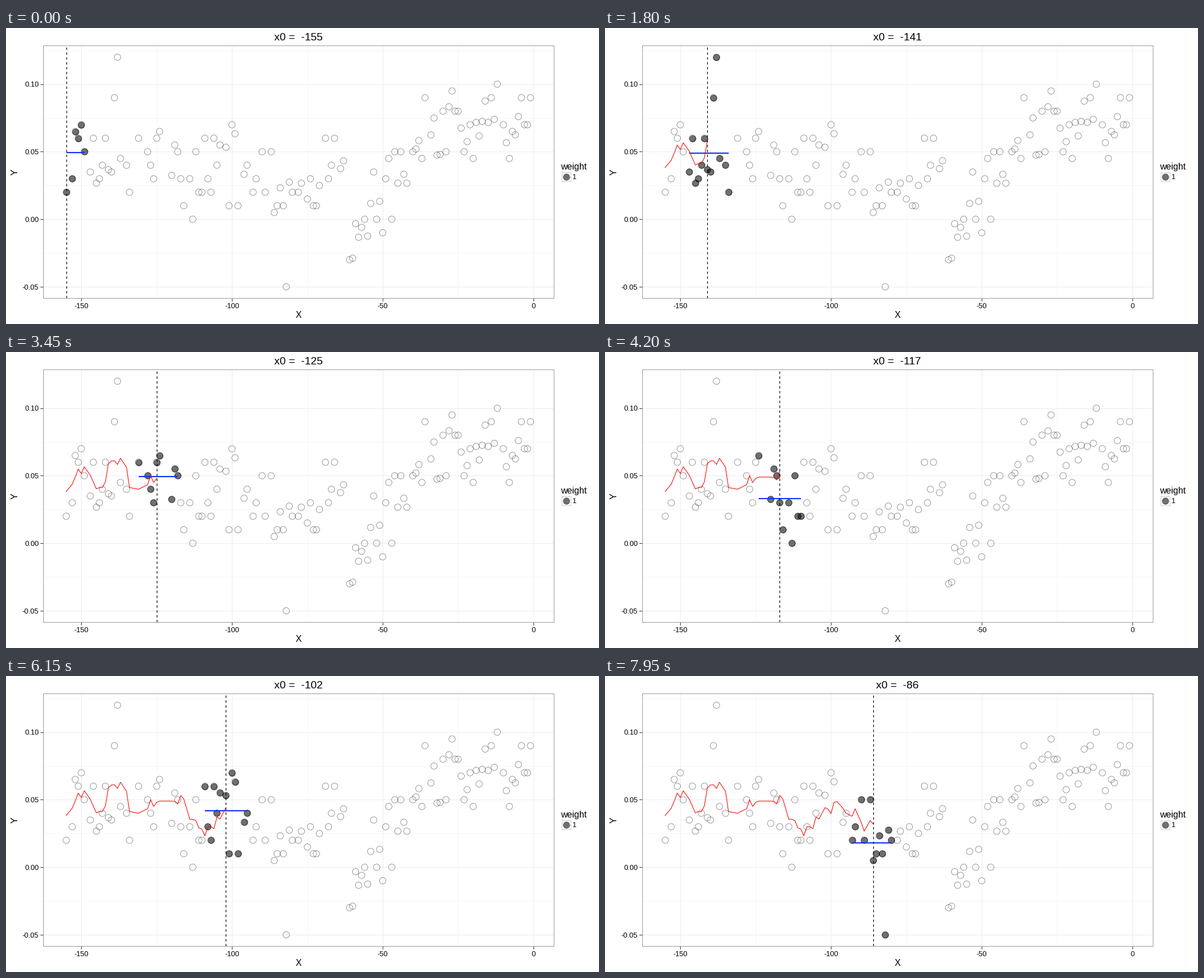
Recreate the animation shown at these times as a matplotlib script. Size 1050 px wide and 525 px high, loop 8000 ms.

```python
import matplotlib.pyplot as plt
import numpy as np
from matplotlib.animation import FuncAnimation

W, H, DPI = 1050, 525, 100
PX = 72 / DPI  # points per pixel
LEFT, RIGHT, TOP, BOTTOM = 65.5, 969.7, 31.4, 479.4
STEP_MS, TICK_MS, LOOP_MS = 150, 50, 8000

plt.rcParams["font.family"] = "Liberation Sans"

# Observations: y in thousandths, one per x in -155..-1 except the gaps
GAPS = {-154, -148, -136, -133, -132, -130, -129, -123, -122, -121, -115, -103,
        -97, -94, -91, -88, -79, -76, -70, -65, -62, -41, -35, -11}
xs = np.array([x for x in range(-155, 0) if x not in GAPS])
ys = np.array([
    20, 30, 65, 60, 70, 50, 35, 60, 26.7, 30,
    40, 60, 36.7, 35, 90, 120, 45, 40, 20,
    60, 50, 40, 30, 60, 65, 32.5, 55, 50, 30, 10,
    30, 0, 50, 20, 20, 60, 30, 20, 60, 40, 55,
    53.3, 10, 70, 63.3, 10, 33.3, 40, 20, 30, 50, 20, 50,
    5, 10, 23.3, 10, -50, 27.5, 20, 20, 26.7, 15, 30, 10, 10, 25,
    60, 30, 40, 60, 37.5, 43.3,
    -30, -28.8, -3.3, -13.3, -6, 0, -12.5, 11.7, 35, 0,
    13.3, -10, 30, 45, 0, 50, 26.7, 50, 33.3, 26.7,
    50, 52, 58.3, 45, 90,
    62.5, 75, 47.5, 48, 80, 50, 83.3, 95, 80, 80, 67.5, 50,
    57.5, 70, 45, 71.7, 61.7, 72.5, 87.5, 71.7, 90, 74, 100,
    70, 56.7, 45, 65, 62.5, 76, 90, 70, 70, 90]) / 1000


def box_mean(center, half):
    return ys[np.abs(xs - center) <= half].mean()


# Box kernel smoother evaluated on an even grid
smooth = np.array([box_mean(c, 3.5) for c in np.linspace(xs[0], xs[-1], len(xs))])

fig = plt.figure(figsize=(W / DPI, H / DPI), dpi=DPI, facecolor="white")
ax = fig.add_axes([LEFT / W, 1 - BOTTOM / H, (RIGHT - LEFT) / W, (BOTTOM - TOP) / H])
XLIM, YLIM = (-162.7, 6.7), (-0.0585, 0.1285)
ax.set(xlim=XLIM, ylim=YLIM, xticks=[], yticks=[])
for spine in ax.spines.values():
    spine.set(color="#9a9a9a", linewidth=PX)


def to_px(x, y):
    px = LEFT + (x - XLIM[0]) / (XLIM[1] - XLIM[0]) * (RIGHT - LEFT)
    py = BOTTOM - (y - YLIM[0]) / (YLIM[1] - YLIM[0]) * (BOTTOM - TOP)
    return px, py


def label(x, y, s, size, ha="center", **kw):
    kw.setdefault("va", "baseline")
    return fig.text(x / W, 1 - y / H, s, fontsize=size * PX, ha=ha, **kw)


def segment(x, y, color="#333333"):
    fig.add_artist(plt.Line2D(np.array(x) / W, 1 - np.array(y) / H,
                              color=color, linewidth=PX))


def grid(x_values, y_values, color):
    for x in x_values:
        ax.axvline(x, color=color, linewidth=PX, zorder=0)
    for y in y_values:
        ax.axhline(y, color=color, linewidth=PX, zorder=0)


X_TICKS, Y_TICKS = (-150, -100, -50, 0), (-0.05, 0, 0.05, 0.1)
grid((-125, -75, -25), (-0.025, 0.025, 0.075, 0.125), "#f6f6f6")
grid(X_TICKS, Y_TICKS, "#ebebeb")

for t in X_TICKS:
    px = to_px(t, 0)[0]
    segment((px, px), (BOTTOM + 0.6, BOTTOM + 4.3))
    label(px, 497, str(t), 12.8)
for t in Y_TICKS:
    py = to_px(0, t)[1]
    segment((LEFT - 4.3, LEFT - 0.6), (py, py))
    label(58, py + 4.6, f"{t:.2f}", 12.8, ha="right")

title = label(517.5, 22, "", 19.2)
label(517.5, 514, "X", 16)
label(16.5, 256, "Y", 16, rotation=90, va="center")

# Marker styles
DIAMETER = 11.4
OPEN = dict(s=(DIAMETER * PX) ** 2, facecolors="none",
            edgecolors=(0, 0, 0, 0.5), linewidths=0.8 * PX)
SOLID = dict(s=(DIAMETER * PX) ** 2, facecolors=(0, 0, 0, 0.56),
             edgecolors=(0, 0, 0, 0.56), linewidths=0.8 * PX)

# Legend
label(982.5, 251, "weight", 16, ha="left")
segment((983.5, 999.5, 999.5, 983.5, 983.5),
        (255.5, 255.5, 271.5, 271.5, 255.5), "#cccccc")
label(1002.5, 268, "1", 12.8, ha="left")
key = fig.add_axes([0, 0, 1, 1], facecolor="none")
key.set(xlim=(0, W), ylim=(H, 0))
key.axis("off")
key.scatter([991.7], [263.5], **SOLID)

# Plot layers
ax.scatter(xs, ys, zorder=2, **OPEN)
near = ax.scatter([], [], zorder=3, **SOLID)
mean_line, = ax.plot([], [], color="#1030ff", linewidth=2.1 * PX,
                     solid_capstyle="butt", zorder=4)
trace, = ax.plot([], [], color="red", linewidth=1.07 * PX, zorder=5)
cursor, = ax.plot([], [], color="black", linewidth=1.2 * PX,
                  dashes=(3.6, 3.6), dash_capstyle="butt", zorder=6)


def draw(tick):
    k = tick * TICK_MS // STEP_MS
    x0 = xs[k]
    inside = np.abs(xs - x0) <= 7
    near.set_offsets(np.column_stack([xs[inside], ys[inside]]))
    mean_line.set_data(xs[inside][[0, -1]], [ys[inside].mean()] * 2)
    trace.set_data(xs[:k + 1], smooth[:k + 1])
    cursor.set_data([x0, x0], YLIM)
    title.set_text(f"x0 =  {x0}")
    return near, mean_line, trace, cursor, title


anim = FuncAnimation(fig, draw, frames=LOOP_MS // TICK_MS, interval=TICK_MS,
                     repeat=True, repeat_delay=0, blit=False)
plt.show()
```
